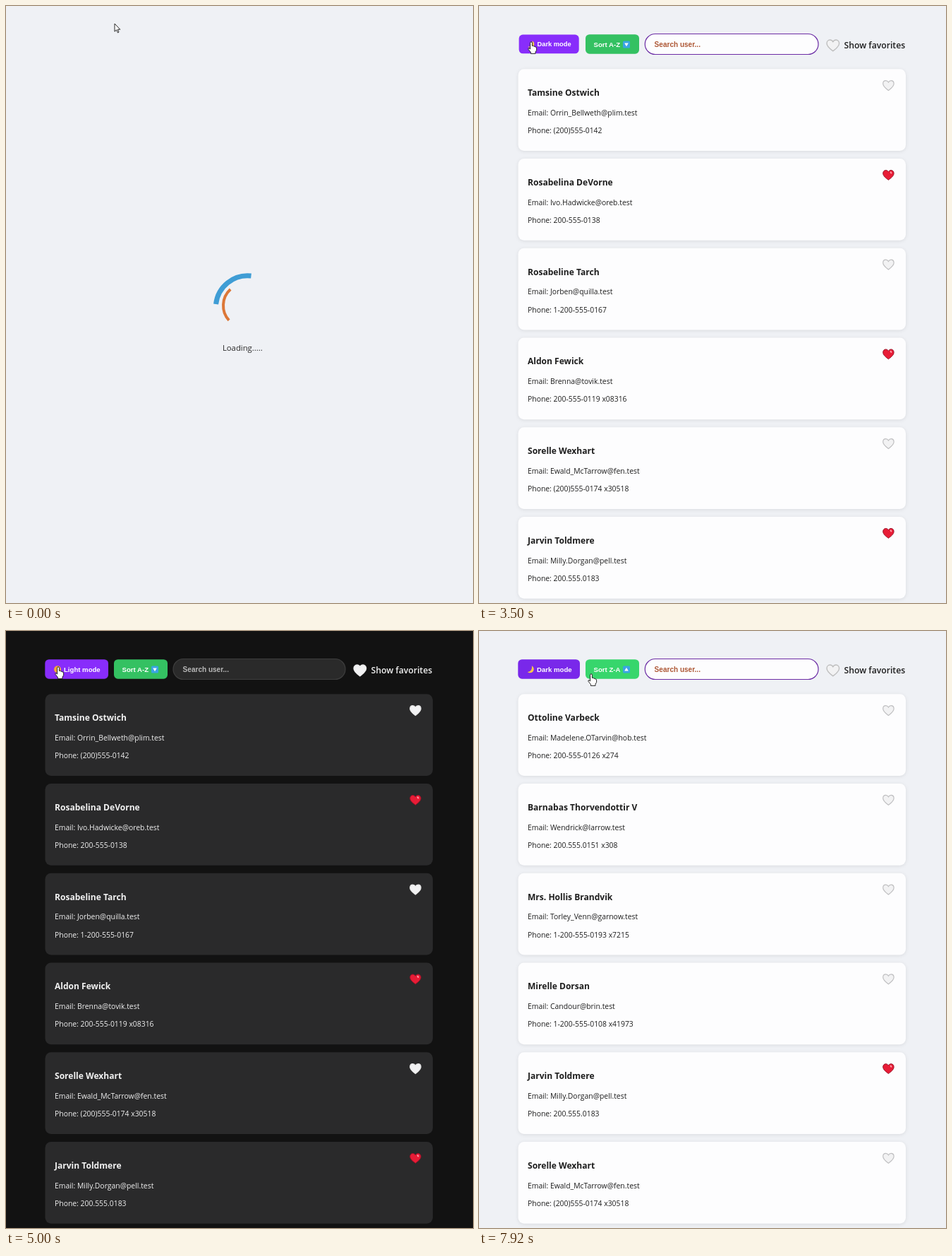
Recreate the animation shown at these times as an HTML page. Size 662 by 845 pixels, loop 8000 ms.

```html
<!DOCTYPE html>
<html lang="en">
<head>
<meta charset="utf-8">
<title>User list</title>
<style>
  html, body { margin: 0; width: 100%; height: 100%; overflow: hidden; background: #eff1f5; }
  svg { display: block; width: 662px; height: 845px; background: var(--bg); }
  text { font-family: "Open Sans", "Noto Sans", sans-serif; fill: var(--fg); white-space: pre; }
  .name { font-size: 12.05px; font-weight: 700; }
  .info { font-size: 10.4px; }
  .fav { font-size: 12.2px; font-weight: 600; }
  .load { font-size: 11.3px; text-anchor: middle; fill: #2a2a2a; }
  .ui { font: 700 9.6px "Liberation Sans", Arial, sans-serif; fill: #fff; }
  .hint { font-size: 10.05px; fill: var(--hint); }
  .card { fill: var(--card); filter: drop-shadow(0 1.4px 2.8px var(--shade)); }
  .field { fill: var(--field); stroke: var(--edge); stroke-width: 1.2; }
  .button { transform-box: fill-box; transform-origin: center; }
  .plain { fill: #f2f2f3; stroke: var(--rim); stroke-width: 1.2; }
  .fav-heart { stroke: var(--favRim); }
  .liked { fill: #e81c36; stroke: #981228; stroke-width: 1; }
  .cursor { fill: #fff; stroke: #1c1c1c; stroke-width: .95; stroke-linejoin: round; }
</style>
</head>
<body>
<svg id="stage" viewBox="0 0 662 845" xmlns="http://www.w3.org/2000/svg">
  <defs>
    <path id="heart" d="M0 7C-3.3 4.5-7.7 1.5-7.7-2.5C-7.7-5.1-5.9-6.8-3.8-6.8C-2-6.8-.7-5.8 0-4.5C.7-5.8 2-6.8 3.8-6.8C5.9-6.8 7.7-5.1 7.7-2.5C7.7 1.5 3.3 4.5 0 7Z"/>
  </defs>

  <g id="loader" fill="none">
    <circle id="outer" cx="342.5" cy="427" r="45.2" stroke="#3f9dd5" stroke-width="7" pathLength="360" stroke-dasharray="90 270"/>
    <circle id="inner" cx="339" cy="424" r="31" stroke="#dc7737" stroke-width="4" pathLength="360" stroke-dasharray="90 270"/>
    <text class="load" x="335.4" y="487.6">Loading.....</text>
  </g>

  <g id="page">
    <rect id="field" class="field" y="39.5" height="29" rx="14.5"/>
    <g id="mode" class="button">
      <rect id="modeBox" x="55.3" y="40.2" height="27.5" rx="5.6"/>
      <path id="moon" fill="#f5c84c" d="M74.8 49.2C77.8 51 78.6 54.4 76.8 57C75 59.5 71.2 60 68.6 57.9C73 57.9 75.8 54 74.8 49.2Z"/>
      <circle id="sun" cx="73" cy="54.3" r="5" fill="#f3a53a"/>
      <text id="modeText" class="ui" x="82" y="57.6"></text>
    </g>
    <g id="shift">
      <g id="sort" class="button">
        <rect id="sortBox" x="151" y="40.2" width="76" height="27.5" rx="5.6"/>
        <text id="sortText" class="ui" x="162.6" y="57.6"></text>
        <rect x="204" y="49.4" width="10" height="10" rx="1.5" fill="#3aa4e4"/>
        <path id="triangle" fill="#fff" d="M206.2 52.4H211.8L209 57.2Z"/>
      </g>
      <text class="ui hint" x="248.6" y="57.7">Search user...</text>
    </g>
    <use href="#heart" class="plain fav-heart" transform="translate(501.8 55.8) scale(1.14)"/>
    <text class="fav" x="517.5" y="59.8">Show favorites</text>
    <g id="asc"></g>
    <g id="desc"></g>
  </g>

  <g id="cursor" class="cursor">
    <path id="arrow" d="M0 0V11.2L2.6 8.8L4.4 12.8L6 12L4.3 8.2H7.8Z"/>
    <path id="hand" d="M-1.4 1.2A1.4 1.4 0 0 1 1.4 1.2V5.4Q3.3 4.8 3.8 6.2Q5.4 5.7 5.9 7Q7.7 6.8 7.6 8.8V11.5L6 14.3V16.4H-.6V14.5L-4 10.3Q-4.5 8.5-3 8.5L-1.4 10Z"/>
  </g>
</svg>

<script>
const LOOP = 8000;
const LOADED = 2150, TO_DARK = 3520, TO_LIGHT = 5190, SORTED = 6900;
const $ = id => document.getElementById(id);

const people = [
  ["Tamsine Ostwich", "Orrin_Bellweth@plim.test", "(200)555-0142"],
  ["Rosabelina DeVorne", "Ivo.Hadwicke@oreb.test", "200-555-0138", true],
  ["Rosabeline Tarch", "Jorben@quilla.test", "1-200-555-0167"],
  ["Aldon Fewick", "Brenna@tovik.test", "200-555-0119 x08316", true],
  ["Sorelle Wexhart", "Ewald_McTarrow@fen.test", "(200)555-0174 x30518"],
  ["Jarvin Toldmere", "Milly.Dorgan@pell.test", "200.555.0183", true],
  ["Mirelle Dorsan", "Candour@brin.test", "1-200-555-0108 x41973"],
  ["Mrs. Hollis Brandvik", "Torley_Venn@garnow.test", "1-200-555-0193 x7215"],
  ["Barnabas Thorvendottir V", "Wendrick@larrow.test", "200.555.0151 x308"],
  ["Ottoline Varbeck", "Madelene.OTarvin@hob.test", "200-555-0126 x274"]
];

function card([name, mail, phone, liked], i) {
  const heart = `<use href="#heart" class="${liked ? "liked" : "plain"}" transform="translate(580.4 23.2)"/>`;
  const shine = liked ? '<ellipse cx="584" cy="19.8" rx="1.1" ry="1.7" fill="#ff9aa6" transform="rotate(-35 584 19.8)"/>' : "";
  return `<g transform="translate(0 ${89.3 + i * 126.75})">
    <rect class="card" x="55.5" width="549.5" height="115.6" rx="8.4"/>
    <text class="name" x="69" y="37.8">${name}</text>
    <text class="info" x="69" y="65.6">Email: ${mail}</text>
    <text class="info" x="69" y="90.9">Phone: ${phone}</text>${heart}${shine}</g>`;
}
$("asc").innerHTML = people.slice(0, 6).map(card).join("");
$("desc").innerHTML = people.slice(4).reverse().map(card).join("");

// time, x, y of the pointer tip
const route = [
  [0, 154, 25], [830, 158, 550], [1000, 150, 620], [1600, -12, 629],
  [2640, -12, 629], [2641, 26, 380], [3300, 74, 51], [5900, 74, 51],
  [6070, 187.5, 58], [6500, 198, 60], [7600, 198, 60], [7920, 159, 61], [LOOP, 159, 61]
];

const clamp = x => Math.max(0, Math.min(1, x));
const lerp = (a, b, k) => a + (b - a) * k;
const mix = (a, b, k) => `rgb(${a.map((v, i) => Math.round(lerp(v, b[i], k)))})`;
const gray = v => [v, v, v];

// CSS "ease": cubic-bezier(.25, .1, .25, 1)
function ease(x) {
  const curve = (a, b, u) => 3 * a * u * (1 - u) ** 2 + 3 * b * u * u * (1 - u) + u ** 3;
  let lo = 0, hi = 1;
  for (let i = 0; i < 20; i++) {
    const u = (lo + hi) / 2;
    if (curve(.25, .25, u) < x) lo = u; else hi = u;
  }
  return curve(.1, 1, lo);
}

function pointer(t) {
  const i = Math.max(1, route.findIndex(p => p[0] >= t));
  const [t0, x0, y0] = route[i - 1], [t1, x1, y1] = route[i];
  const k = clamp((t - t0) / (t1 - t0)), s = k * k * (3 - 2 * k);
  return [lerp(x0, x1, s), lerp(y0, y1, s)];
}

function pressScale(t, down, up) {
  if (t < down || t > up + 100) return 1;
  return t < up ? .97 : lerp(.97, 1, (t - up) / 100);
}

function show(id, on) { $(id).style.display = on ? "" : "none"; }
function label(id, text) { if ($(id).textContent !== text) $(id).textContent = text; }

function render(t) {
  const loaded = t >= LOADED, sorted = t >= SORTED;
  const dark = t >= TO_DARK && t < TO_LIGHT;
  const step = from => ease(clamp((t - from) / 300));
  const light = t < TO_LIGHT ? 1 - step(TO_DARK) : step(TO_LIGHT);
  const slow = light ** 1.35;

  const theme = {
    bg: mix(gray(18), [239, 241, 245], light),
    fg: mix(gray(241), gray(30), light),
    card: dark ? "#2a2a2b" : "#fdfdfe",
    shade: dark ? "transparent" : "rgba(0,0,0,.09)",
    field: mix(gray(42), [253, 253, 254], slow),
    edge: mix(gray(62), [108, 45, 165], slow),
    hint: dark ? "#b8b8b8" : mix([222, 92, 62], [174, 88, 54], light),
    rim: dark ? "#e9e9e9" : "#bfbfc1",
    favRim: mix(gray(235), gray(190), light)
  };
  for (const key in theme) $("stage").style.setProperty("--" + key, theme[key]);

  show("loader", !loaded);
  show("page", loaded);
  show("asc", !sorted);
  show("desc", sorted);
  $("outer").setAttribute("transform", `rotate(${186 + t * 360 / 1016} 342.5 427)`);
  $("inner").setAttribute("transform", `rotate(${138 - t * 360 / 1217} 339 424)`);

  const [x, y] = pointer(t);
  const inRow = loaded && y > 40 && y < 68;
  const onMode = inRow && x > 55 && x < 144;
  const onSort = inRow && x > 151 && x < 228;

  $("modeBox").setAttribute("width", dark ? 89.7 : 87.7);
  $("modeBox").setAttribute("fill", onMode ? "#882dfb" : "#7928ea");
  $("sortBox").setAttribute("fill", onSort ? "#37d66c" : "#34c162");
  label("modeText", dark ? "Light mode" : "Dark mode");
  label("sortText", sorted ? "Sort Z-A" : "Sort A-Z");
  show("moon", !dark);
  show("sun", dark);
  $("triangle").setAttribute("transform", sorted ? "rotate(180 209 54.5)" : "");
  $("shift").setAttribute("transform", `translate(${dark ? 2 : 0} 0)`);
  $("field").setAttribute("x", dark ? 237 : 235.3);
  $("field").setAttribute("width", dark ? 244 : 245.7);

  const modeScale = Math.min(pressScale(t, 3440, TO_DARK), pressScale(t, 5140, TO_LIGHT));
  $("mode").style.transform = `scale(${modeScale})`;
  $("sort").style.transform = `scale(${pressScale(t, 6825, SORTED)})`;

  $("cursor").setAttribute("transform", `translate(${x} ${y})`);
  show("hand", onMode || onSort);
  show("arrow", !(onMode || onSort));
}

const start = performance.now();
function tick() {
  render((performance.now() - start) % LOOP);
  requestAnimationFrame(tick);
}
render(0);
requestAnimationFrame(tick);
</script>
</body>
</html>
```
